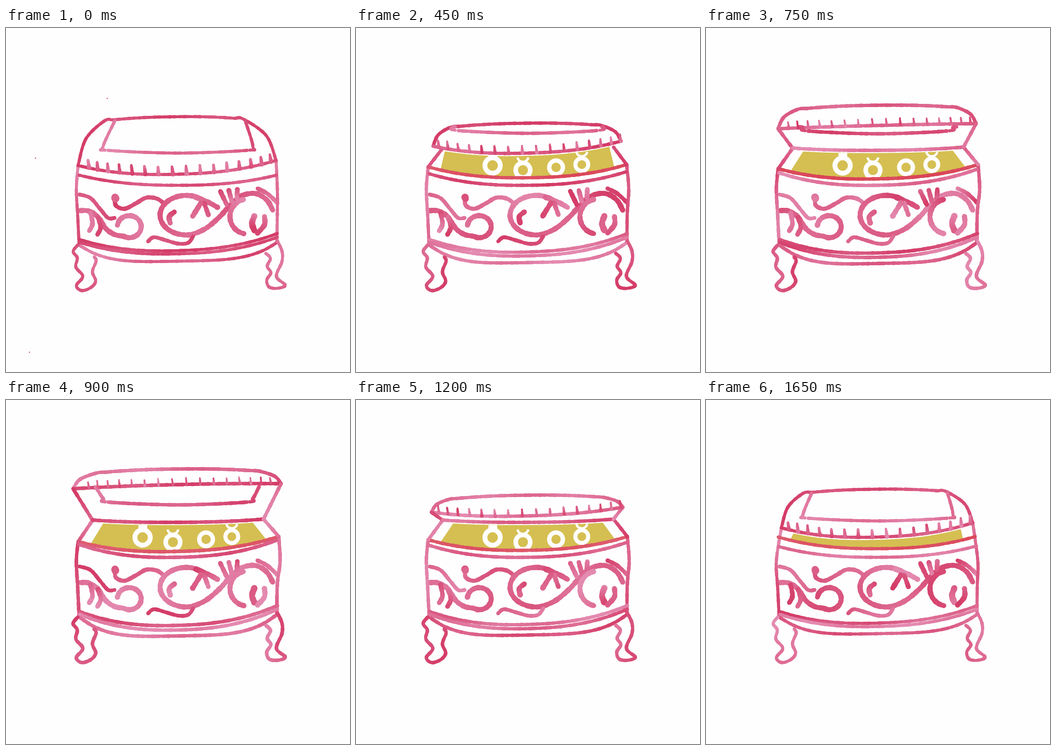
Write an HTML page with a canvas that moves like this. It is 748x748 px and loops after 1800 ms.

```html
<!DOCTYPE html>
<html lang="en">
<head>
<meta charset="utf-8">
<title>Jewellery box</title>
<style>
  html, body { margin: 0; width: 100%; height: 100%; overflow: hidden; background: #fefefe; }
  canvas { display: block; width: 100vw; height: 100vh; }
</style>
</head>
<body>
<canvas id="stage" width="748" height="748"></canvas>
<script>
const ctx = document.getElementById('stage').getContext('2d');
const STEP = 150, GOLD = '#d5bf52', PAPER = '#fefefe';
const DARK = [212, 61, 104], LIGHT = [228, 138, 176], RED = [220, 72, 80];

// Heights of the lid from shut to wide open: left end and middle of its lip, top, inlaid panel.
const poses = [
  { lip: 299, mid: 318, top: 193, panel: 272, specks: '220,153 64,283 51,705' },
  { lip: 278, mid: 298, top: 194, panel: 263 },
  { lip: 267, mid: 283, top: 205, panel: 251 },
  { lip: 257, mid: 272, top: 207, panel: 229 },
  { lip: 244, mid: 252, top: 207 },
  { lip: 219, mid: 212, top: 168, panel: 230 },
  { lip: 193, mid: 184, top: 150, panel: 228 }
];

const legs = [
  '156,472 146,486 155,500 152,520 167,540 153,560 165,571 185,564 195,550 188,530 196,507 192,498',
  '565,490 575,501 568,518 576,532 567,548 572,563 590,566 607,559 588,540 600,508 600,485 590,463'
];

let pen = 0; // counts strokes, so each gets its own seeded tone

const mix = (a, b, k) => a.map((v, i) => v + (b[i] - v) * k);
const random = n => Math.abs(Math.sin(n * 127.1 + 3) * 43758.5) % 1;
const points = text => text.split(' ').map(pair => pair.split(',').map(Number));
const shift = (pts, dy) => pts.map(([x, y]) => [x, y + dy]);

// A sagging edge between two points that passes the given height halfway.
function bow(from, to, midY, power = 2.4) {
  const sag = midY - (from[1] + to[1]) / 2;
  return Array.from({ length: 17 }, (_, i) => {
    const t = i / 16, [x, y] = mix(from, to, t);
    return [x, y + sag * (1 - Math.abs(2 * t - 1) ** power)];
  });
}

function arc(cx, cy, rx, ry, start, end) {
  return Array.from({ length: 13 }, (_, i) => {
    const a = start + (end - start) * i / 12;
    return [cx + rx * Math.cos(a), cy + ry * Math.sin(a)];
  });
}

// Catmull-Rom samples, about 1.5 px apart.
function smooth(pts) {
  const out = [pts[0]];
  for (let i = 0; i + 1 < pts.length; i++) {
    const b = pts[i], c = pts[i + 1], a = pts[i - 1] || b, d = pts[i + 2] || c;
    const n = Math.ceil(Math.hypot(c[0] - b[0], c[1] - b[1]) / 1.5);
    for (let j = 1; j <= n; j++) {
      const t = j / n;
      out.push([0, 1].map(k => b[k] + t / 2 * (c[k] - a[k] +
        t * (2 * a[k] - 5 * b[k] + 4 * c[k] - d[k] + t * (3 * (b[k] - c[k]) + d[k] - a[k])))));
    }
  }
  return out;
}

function dab(x, y, r, colour) {
  ctx.fillStyle = colour;
  ctx.beginPath();
  ctx.arc(x, y, r, 0, 7);
  ctx.fill();
}

// A felt-tip line whose width and tone waver along its length.
function stroke(width, shape, { taper = 0, tint } = {}) {
  const path = smooth(typeof shape === 'string' ? points(shape) : shape);
  const seed = ++pen, from = random(seed), to = random(seed + .5);
  path.forEach(([x, y], i) => {
    const k = i / path.length;
    const rough = Math.sin(i * .31 + seed) * .05 + Math.sin(i * .83 + seed * 2) * .05;
    const tone = from + (to - from) * k + Math.sin(i * .045 + seed) * .15;
    let rgb = mix(DARK, LIGHT, Math.min(1, Math.max(0, tone)));
    if (tint) rgb = mix(rgb, tint, .7);
    dab(x, y, width / 2 * (1 + rough) * (1 - taper * k), `rgb(${rgb.map(Math.round)})`);
  });
}

function drawVine() {
  // left tendril
  stroke(8, '160,362 184,370 205,394 222,413 236,413');
  stroke(11, [...points('161,397 180,398 200,411 217,436 236,449'), ...arc(268, 432, 26, 24, 2.1, -3)]);
  stroke(10, '184,402 188,426 181,441');
  stroke(10, '200,412 206,433 199,449');
  stroke(9, '237,368 239,386 258,393 283,381 305,369 328,371 344,382');
  stroke(16, '237,368 238,371');
  // middle loop and its leaf
  stroke(11, [...arc(392, 407, 57, 43, -.75, -4.71),
    ...points('410,447 437,434 465,410 486,387 512,365 543,360 567,374 580,396')]);
  stroke(11, '412,368 440,379 460,390');
  stroke(10, '431,381 440,406');
  stroke(11, '424,380 406,409');
  stroke(11, '366,400 355,410 357,424');
  for (let i = 0; i < 3; i++) {
    stroke(10, [[466 + 18.5 * i, 355 - 2 * i], [480 + 11 * i, 384 - 7 * i]]);
  }
  // right leaf
  stroke(11, arc(525, 410, 38, 38, -1.8, -4.5));
  stroke(13, '540,409 535,425 540,440');
  stroke(11, '562,410 562,428 547,446');
  stroke(9, '547,349 568,360 590,380');
  stroke(8, '309,464 322,455 349,462 375,469 396,467 407,453');
}

function drawRing([x, y], i, neck) {
  const r = 22 - 1.2 * i;
  dab(x, y, r, PAPER);
  dab(x, y, r * .52, GOLD);
  if (!neck) return;
  ctx.fillStyle = ctx.strokeStyle = PAPER;
  if (i === 0) ctx.fillRect(x - 9, y - 27, 19, 14);
  if (i % 2) {
    ctx.lineWidth = 5;
    ctx.beginPath();
    ctx.arc(x, y - 30, 12, .2, Math.PI - .2);
    ctx.stroke();
  }
}

function drawInside(n, back, rim) {
  ctx.fillStyle = GOLD;
  ctx.beginPath();
  [...shift(back, 6).slice(1, -1), ...shift(rim, -2).slice(1, -1).reverse()].forEach(p => ctx.lineTo(...p));
  ctx.fill();
  if (n > 1) points('297,299 363,309 435,303 491,297').forEach((at, i) => drawRing(at, i, n > 2));
}

function drawBody(n, width, rim, lip) {
  const [left, right] = (n < 2 ? lip : rim).filter((_, i) => i % 16 === 0);
  stroke(width, [left, [153, 350], [156, 410], [159, 472]]);
  stroke(width, [right, [590 + n, 350], [590, 400], [589, 465]]);
  if (n) stroke(width, rim, { tint: RED });
  stroke(width, bow([159, 320 - n], [588, 320 - 2.5 * n], 342));
  stroke(width, bow([160, 460], [590, 447], 484 + n));
  stroke(width, bow([160, 466], [590, 455], 491 + 1.5 * n));
  stroke(width, bow([162, 474], [590, 466], 507 + n, 4));
  legs.forEach(leg => stroke(width, leg));
}

function drawLid(n, { lip, top, panel }, width, edge, hinge) {
  const left = edge[0], right = edge[16];
  const shoulders = [[214 - 3 * n, top + 9], [516 + 6 * n, top + 5]];
  const bulge = (corner, shoulder) =>
    [corner[0] + (shoulder[0] - corner[0]) * .3, corner[1] + (shoulder[1] - corner[1]) * .6];
  stroke(width, [left, bulge(left, shoulders[0]), ...bow(...shoulders, top),
    bulge(right, shoulders[1]), right]);
  stroke(width, edge);
  if (n > 3) {
    stroke(width, [left, hinge[0]]);
    stroke(width, hinge);
    stroke(width, [hinge[16], right]);
  }
  if (panel) {
    const y = n > 3 ? lip - 4 : top + 8;
    stroke(width, [[237 - 7 * n, y], [211, panel - 14], [222, panel - 6], [374, panel],
      [524, panel - 6], [537, panel - 14], [520 + 5 * n, y]]);
  }
  drawTeeth(n, smooth(edge));
}

// Teeth crowd together towards both ends of the lip.
function drawTeeth(n, edge) {
  for (let i = -1; i < 15; i++) {
    const x = 377 + 248 * Math.sin(.8 * (i - 6.5) / 6.5);
    const point = edge.find(p => p[0] >= x);
    if (!point) continue;
    const height = 16 - .7 * n + 3 * random(i + n * 20);
    stroke(9 - .6 * n, [point, [x - 1, point[1] - height]], { taper: .45 });
  }
}

function drawBox(n) {
  const pose = poses[n], width = 6.6 + n * .15;
  const reach = 1.8 * (n - 2.5) ** 2;
  const lip = bow([168 - reach, pose.lip], [576 + reach, pose.lip - 11], pose.mid);
  const hinge = bow([188, 261], [560, 259], 266);
  const rim = bow([157, 296 + 2 * n], [584 + 1.5 * n, 297], 322 + 1.2 * n);

  pen = n * 100;
  ctx.fillStyle = PAPER;
  ctx.fillRect(0, 0, 748, 748);
  if (n) drawInside(n, n < 4 ? lip : hinge, rim);
  drawVine();
  drawBody(n, width, rim, lip);
  if (n > 1) {
    const y = Math.max(262, pose.lip + 4);
    stroke(width, [[188, y], rim[0]]);
    stroke(width, [[560, y - 3], rim[16]]);
  }
  drawLid(n, pose, width, lip, hinge);
  if (pose.specks) points(pose.specks).forEach(([x, y]) => dab(x, y, 1.3, `rgb(${DARK})`));
}

let shown = -1;
function tick() {
  const step = Math.floor(performance.now() / STEP) % 12;
  const n = step < 7 ? step : 12 - step; // opens, then closes the same way
  if (n !== shown) drawBox(shown = n);
  requestAnimationFrame(tick);
}
tick();
</script>
</body>
</html>
```
